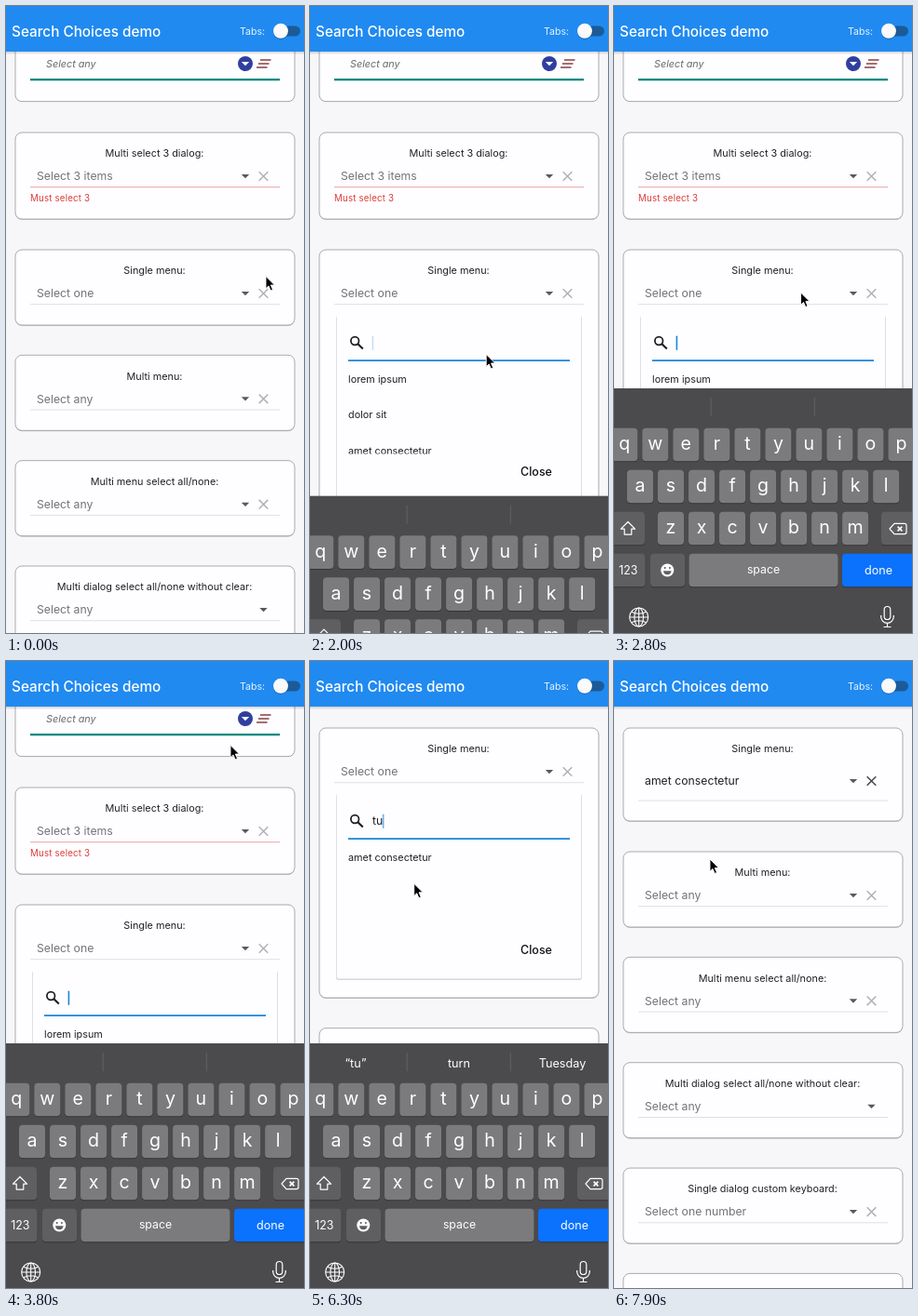
Recreate the animation shown at these times as an HTML page. Size 320 by 674 pixels, loop 8 s.

```html
<!DOCTYPE html>
<html lang="en">
<head>
<meta charset="utf-8">
<title>Search Choices demo</title>
<style>
  html, body { margin: 0; width: 100%; height: 100%; overflow: hidden; background: #f7f6f9; }
  svg { display: block; font-family: Inter, "Open Sans", sans-serif; }
  text { white-space: pre; }
</style>
</head>
<body>
<svg id="stage" width="320" height="674" viewBox="0 0 320 674"></svg>
<script>
const LOOP = 8000;
const GREY = '#747376', DARK = '#202022';
const ITEMS = ['lorem ipsum', 'dolor sit', 'amet consectetur'];

// Drawing helpers; text is placed by the middle of its capitals.
const text = (s, x, y, size, fill, extra = '') =>
  `<text x="${x}" y="${y + size * 0.36}" font-size="${size}" fill="${fill}" ${extra}>${s}</text>`;
const mid = (s, x, y, size, fill, extra = '') => text(s, x, y, size, fill, 'text-anchor="middle" ' + extra);
const rect = (x, y, w, h, fill, r = 0, extra = '') =>
  `<rect x="${x}" y="${y}" width="${w}" height="${h}" rx="${r}" fill="${fill}" ${extra}/>`;
const path = (d, stroke, width = 1.3, extra = '') =>
  `<path d="${d}" fill="none" stroke="${stroke}" stroke-width="${width}" ${extra}/>`;
const group = (id, body, extra = '') => `<g id="${id}" ${extra}>${body}</g>`;
const arrow = (x, y, fill = '#59585b') => `<path d="M${x - 4.2} ${y - 2}h8.4l-4.2 4.3z" fill="${fill}"/>`;
const cross = (x, y, stroke, r = 4.8) =>
  path(`M${x - r} ${y - r}l${2 * r} ${2 * r}m0 ${-2 * r}l${-2 * r} ${2 * r}`, stroke, 1.6);

function card(y, h, label) {
  return rect(10, y + 1, 300, h, '#cbc9cd', 7) +
    rect(10, y, 300, h, '#fefdff', 7, 'stroke="#a3a1a5" stroke-width=".9"') +
    mid(label, 159.5, y + 22.5, 10.85, DARK);
}
function field(y, value, { color = GREY, clear = '#b3b2b5', line = '#dddce0', gap = 11.3 } = {}) {
  return text(value, 33, y, 12.25, color) + arrow(clear ? 257 : 276.5, y) +
    (clear ? cross(276.5, y, clear) : '') + rect(26, y + gap, 268, 0.9, line);
}
const closedCard = (y, label, value, options) => card(y, 81, label) + field(y + 47, value, options);

const upperCards =
  rect(10, -9, 300, 112, '#cbc9cd', 7) +
  rect(10, -10, 300, 112.6, '#fefdff', 7, 'stroke="#a3a1a5" stroke-width=".9"') +
  text('Select any', 43, 62, 10.8, '#6a696c', 'font-style="italic"') +
  `<circle cx="257" cy="62" r="8" fill="#303f9f"/>` + arrow(257, 62, '#fff') +
  path('M273 58h11.5M271 62h11.5M269 66h11.5', '#873f40', 1.6) +
  rect(26, 78, 268, 2.3, '#078a80') +
  card(136, 93, 'Multi select 3 dialog:') +
  field(183, 'Select 3 items', { line: '#e49a97' }) +
  text('Must select 3', 26, 207, 9.7, '#dc3d38', 'letter-spacing=".2"');

const menu =
  card(262, 290, 'Single menu:') + field(309, 'Select one') +
  rect(28.2, 333, 263.6, 199.8, '#cfced2', 2) +
  rect(28.8, 330, 262.4, 201.6, '#fefdff', 2) +
  `<circle cx="48.2" cy="360" r="4.3" fill="none" stroke="#1b1b1d" stroke-width="1.7"/>` +
  path('M51.4 363.2l5.4 5.4', '#1b1b1d', 2.1) +
  text('', 67, 362, 12.25, DARK, 'id="query"') +
  rect(66.6, 354.5, 1.6, 15.5, '#1c86da', 0.8, 'id="caret"') +
  rect(41, 380.2, 238, 1.8, '#218ad9') +
  group('items', ITEMS.map(s => text(s, 41, 401, 10.85, DARK)).join(''), 'clip-path="url(#listClip)"') +
  mid('Close', 243, 500.5, 12.5, '#111', 'font-weight="500"');

const lowerCards = [
  ['Multi menu:', 'Select any'],
  ['Multi menu select all/none:', 'Select any'],
  ['Multi dialog select all/none without clear:', 'Select any', { clear: null }],
  ['Single dialog custom keyboard:', 'Select one number'],
  ['', '']
].map((args, i) => closedCard(375.3 + i * 113.35, ...args)).join('');

const header =
  rect(0, 49, 320, 1.2, '#00000026') + rect(0, 50, 320, 1.6, '#00000012') +
  rect(0, 0, 320, 49, '#208af1') +
  text('Search Choices demo', 6, 27, 15.3, '#fff', 'font-weight="500"') +
  text('Tabs:', 251, 27, 10.6, '#e8f3ff') +
  rect(288, 21.5, 28, 11, '#1c5b97', 5.5) +
  `<circle cx="295" cy="27.6" r="8.3" fill="#0003"/><circle cx="295" cy="26.8" r="8" fill="#fbfafc"/>`;

const KEY = '#7b7a7c', SIDE_KEY = '#5f5e60';
const key = (x, y, w, fill) =>
  rect(x, y - 17, w, 35.8, '#343335', 4) + rect(x, y - 17.8, w, 35.6, fill, 4);
const keyRow = (letters, x, y) => [...letters].map((c, i) =>
  key(x + i * 33.02 - 14, y, 28, KEY) + mid(c, x + i * 33.02, y - 1.5, 19.6, '#fff')).join('');

const keyboard =
  rect(0, 411, 320, 264, '#4b4a4c') +
  rect(103.6, 421, 0.9, 20, '#666567') + rect(214.8, 421, 0.9, 20, '#666567') +
  group('hints', [49, 160, 271].map(x => mid('', x, 432, 12.7, '#fff')).join('')) +
  keyRow('qwertyuiop', 11.3, 471.5) + keyRow('asdfghjkl', 28, 516.5) + keyRow('zxcvbnm', 61, 561.5) +
  key(-5, 561.5, 38, SIDE_KEY) +
  path('M15 554.5l7.6 7.6h-3.8v6h-7.6v-6h-3.8z', '#fff', 1.2, 'stroke-linejoin="round"') +
  key(287, 561.5, 38, SIDE_KEY) +
  path('M296 562l5-5.6h11q2 0 2 2v7.2q0 2-2 2h-11z', '#fff', 1.2, 'stroke-linejoin="round"') +
  cross(307, 562, '#fff', 2.4) +
  key(-5, 606.5, 38.5, SIDE_KEY) + mid('123', 15.3, 606.5, 12.4, '#fff') +
  key(39, 606.5, 37, SIDE_KEY) +
  `<circle cx="57.3" cy="606.5" r="7" fill="#fff"/>` +
  path('M54.7 603v2M59.9 603v2', SIDE_KEY, 1.5) +
  `<path d="M53 607.3h8.6q-.5 4-4.3 4t-4.3-4z" fill="${SIDE_KEY}"/>` +
  key(80.5, 606.5, 160, KEY) + mid('space', 160.5, 606, 12.3, '#fff') +
  key(245, 606.5, 80, '#0a72fd') + mid('done', 284, 606, 12.6, '#fff') +
  `<g fill="none" stroke="#fff" stroke-width="1.1"><circle cx="26.7" cy="657" r="10"/>
   <ellipse cx="26.7" cy="657" rx="4.8" ry="10"/></g>` +
  path('M26.7 647v20M16.7 657h20M18.8 651.3q7.9 4 15.8 0M18.8 662.7q7.9-4 15.8 0', '#fff', 1.1) +
  rect(290.2, 645.5, 6.6, 14, 'none', 3.3, 'stroke="#fff" stroke-width="1.2"') +
  path('M286.7 655v1.5a6.8 6.8 0 0 0 13.6 0V655M293.5 663.3v4M289.5 667.5h8', '#fff', 1.2);

const stage = document.getElementById('stage');
stage.innerHTML =
  '<defs><clipPath id="listClip"><rect x="30" y="385" width="260" height="96.5"/></clipPath></defs>' +
  rect(0, 0, 320, 674, '#f7f6f9') +
  group('page', upperCards +
    group('closed', closedCard(262, 'Single menu:', 'Select one')) +
    group('menu', menu) +
    group('picked', card(262, 100, 'Single menu:') +
      field(319, ITEMS[2], { color: DARK, clear: '#4c4b4e', gap: 20.6 })) +
    group('lower', lowerCards)) +
  header + group('keyboard', keyboard) +
  group('cursor', '<path d="M0 0v13.2l3-2.8 2.2 5 2.3-1-2.2-4.9h4.2z" fill="#000" stroke="#fff" stroke-width=".9"/>');

const el = Object.fromEntries([...stage.querySelectorAll('[id]')].map(node => [node.id, node]));
const move = (node, x, y) => node.setAttribute('transform', `translate(${x} ${y})`);
const show = (node, on) => node.setAttribute('display', on ? 'inline' : 'none');

const clamp = v => Math.min(1, Math.max(0, v));
const progress = (t, from, to) => clamp((t - from) / (to - from));
const smooth = p => p * p * (3 - 2 * p);
const easeOut = p => 1 - (1 - p) ** 3;

// Pointer path: time, x, y
const POINTER = [
  [100, 279, 290.5], [800, 255, 310], [1450, 255, 310], [1900, 190, 372], [2200, 187, 381.5],
  [2500, 187, 381.5], [3400, 239, 100], [3800, 241, 90.5], [3950, 241, 90.5], [4900, 193, 373],
  [5650, 193, 373], [6550, 93, 208.5], [7600, 93, 208.5], [7900, 103, 213]
];
function pointerAt(t) {
  let [, x, y] = POINTER[0];
  for (let i = 1; i < POINTER.length; i++) {
    const p = smooth(progress(t, POINTER[i - 1][0], POINTER[i][0]));
    x += (POINTER[i][1] - POINTER[i - 1][1]) * p;
    y += (POINTER[i][2] - POINTER[i - 1][2]) * p;
  }
  return [x, y];
}

function draw(now) {
  const t = now % LOOP;
  const open = t >= 1100 && t < 7500, picked = t >= 7500;

  move(el.page, 0, -190 * smooth(progress(t, 3900, 4600)));
  show(el.closed, t < 1100);
  show(el.menu, open);
  show(el.picked, picked);
  move(el.lower, 0, open ? 209.4 : picked ? 19.7 : 0);

  const query = t < 5100 ? '' : t < 5300 ? 't' : 'tu';
  el.query.textContent = query;
  move(el.caret, query ? el.query.getComputedTextLength() : 0, 0);
  el.caret.setAttribute('opacity', clamp(0.85 - 0.75 * Math.cos((t - 100) / 500 * Math.PI)));
  let row = 0;
  [...el.items.children].forEach((item, i) => {
    const match = ITEMS[i].includes(query);
    show(item, match);
    if (match) move(item, 0, 38.5 * row++);
  });

  const hints = t < 5300 ? ['“t”', '', ''] : ['“tu”', 'turn', 'Tuesday'];
  [...el.hints.children].forEach((hint, i) => hint.textContent = hints[i]);
  el.hints.setAttribute('opacity', progress(t, 4970, 5100));

  const raised = easeOut(progress(t, 1900, 2320)) - easeOut(progress(t, 7600, 7900));
  show(el.keyboard, raised > 0);
  move(el.keyboard, 0, 264 * (1 - raised));
  move(el.cursor, ...pointerAt(t));
}

function tick() {
  draw(performance.now());
  requestAnimationFrame(tick);
}
tick();
</script>
</body>
</html>
```
